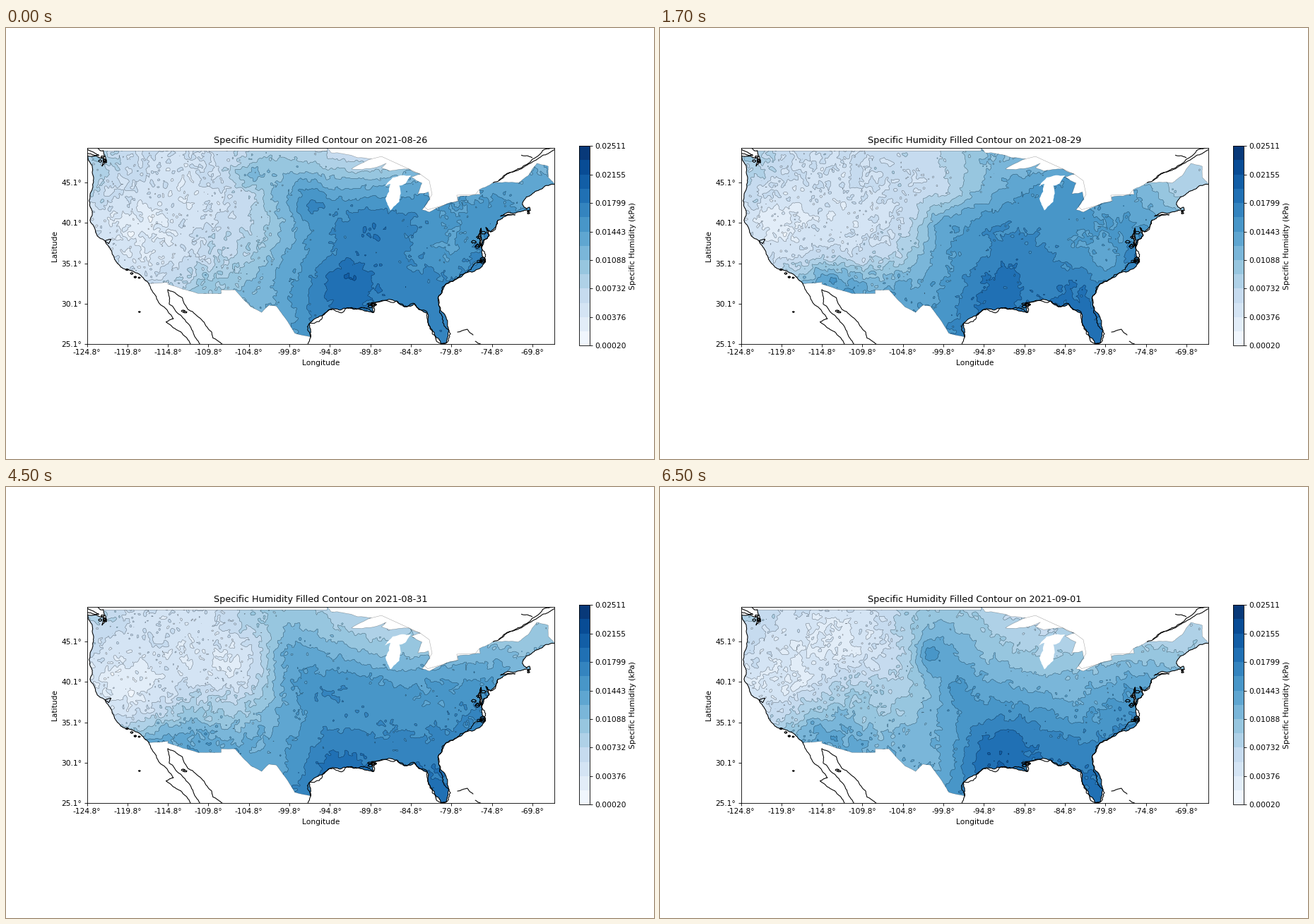
Animation, 917 px wide and 611 px high, one loop 8000 ms. Source, as a matplotlib script:

```python
import numpy as np
import matplotlib.pyplot as plt
from matplotlib.animation import FuncAnimation
from matplotlib.path import Path

W, H, S = 917, 611, 0.764
WEST, EAST, SOUTH, NORTH = -124.767, -67.058, 25.067, 49.4
LEVELS = np.linspace(0.0002, 0.02511, 15)
rng = np.random.default_rng(12)

plt.rcParams.update({
    "font.family": "DejaVu Sans", "font.size": 10 * S,
    "axes.titlesize": 12 * S, "axes.titlepad": 6 * S, "axes.labelpad": 4 * S,
    "axes.linewidth": 0.8 * S,
    **{f"{a}tick.major.{k}": v * S for a in "xy"
       for k, v in (("size", 3.5), ("width", 0.8), ("pad", 3.5))},
})

X, Y = np.meshgrid(np.linspace(WEST, EAST, 520), np.linspace(SOUTH, NORTH, 220))


def roughen(points, depth=4, jag=0.13):
    """Midpoint displacement of a polyline."""
    p = np.array(points, float)
    for _ in range(depth):
        step = np.diff(p, axis=0)
        normal = step[:, ::-1] * [-1, 1]
        mid = p[:-1] + step / 2 + normal * rng.uniform(-jag, jag, (len(step), 1))
        out = np.empty((2 * len(p) - 1, 2))
        out[::2], out[1::2] = p, mid
        p = out
    return p


def fractal_noise(slope=1.35, longest=2.5):
    """Unit-variance noise without waves longer than `longest` degrees."""
    ky = np.fft.fftfreq(Y.shape[0], Y[1, 0] - Y[0, 0])[:, None]
    kx = np.fft.rfftfreq(X.shape[1], X[0, 1] - X[0, 0])
    k = np.hypot(kx, ky)
    gain = (k ** 2 + 1 / longest ** 2) ** (-slope / 2) * np.exp(-(k / 2.6) ** 2)
    noise = np.fft.irfft2(np.fft.rfft2(rng.normal(size=X.shape)) * gain, X.shape)
    return (noise - noise.mean()) / noise.std()


# ---- outlines as (lon, lat) ----
pacific = roughen([
    (-122.76, 49), (-122.4, 47.9), (-122.9, 47.1), (-122.7, 48.1), (-124.7, 48.38),
    (-124.1, 46.9), (-123.95, 45.5), (-124.5, 42.85), (-124.1, 41.5), (-124.4, 40.4),
    (-123.7, 38.9), (-122.5, 37.75), (-121.8, 36.7), (-120.6, 34.6), (-119.3, 34.15),
    (-118.35, 33.75), (-117.12, 32.53)], jag=0.1)
rio = roughen([
    (-117.12, 32.53), (-114.72, 32.72), (-114.8, 32.5), (-111.07, 31.33), (-108.2, 31.33),
    (-108.2, 31.78), (-106.5, 31.78), (-104.5, 29.65), (-103.2, 28.98), (-102.3, 29.88),
    (-101.4, 29.77), (-100.3, 28.3), (-99.1, 26.4), (-97.15, 25.96)], 3, 0.02)
GULF = [
    (-97.15, 25.96), (-97.3, 27.6), (-94.75, 29.35), (-92.3, 29.53), (-91.3, 29.4),
    (-89.4, 28.95), (-89.6, 30.2), (-86.5, 30.38), (-85.3, 29.68), (-84.3, 30.05),
    (-82.75, 28.9), (-82.6, 27.6), (-81.8, 26.1), (-81.1, 25.15), (-80.4, 25.2)]
SOUTHEAST = [
    (-80.4, 25.2), (-80.05, 26.7), (-81.3, 29.8), (-81.4, 30.9), (-80.6, 32.3),
    (-79.2, 33.1), (-77.95, 33.9), (-75.55, 35.25), (-76, 36.9), (-76.4, 38.3),
    (-76.1, 39.4), (-75.95, 37.2), (-75.1, 38.5), (-75.5, 39.5), (-74.9, 38.95), (-74, 40.4)]
northeast = roughen([
    (-74, 40.4), (-71.9, 41.07), (-73.7, 40.9), (-71.4, 41.45), (-70, 41.6), (-70.1, 42),
    (-70.5, 41.8), (-71, 42.35), (-70.5, 43.3), (-69, 44.1), (-67, 44.85)])
north = roughen([
    (-67, 44.85), (-67.8, 45.7), (-67.8, 47.07), (-69.2, 47.45), (-70.3, 45.9),
    (-71.5, 45.02), (-74.7, 45), (-76.3, 44.2), (-76.2, 43.6), (-79, 43.27),
    (-78.9, 42.8), (-82.5, 41.4), (-83.4, 41.7), (-82.4, 43), (-82.6, 43.9),
    (-83.9, 43.65), (-83.4, 45), (-84.75, 45.75), (-83.6, 46.1), (-85, 46.75),
    (-87.4, 46.5), (-88.4, 46.9), (-87.8, 47.45), (-89.6, 46.83), (-92.1, 46.75),
    (-89.6, 48), (-93, 48.6), (-94.6, 48.75), (-95.15, 49.38)], 3, 0.05)
parallel = np.array([(-95.15, 49.38), (-95.15, 49), (-122.76, 49)])
lake = roughen([
    (-87.3, 41.62), (-87.9, 43.1), (-87.3, 44.9), (-88, 44.6), (-87, 45.7),
    (-84.75, 45.95), (-85.5, 44.9), (-86.2, 44.7), (-86.2, 42.7), (-87.3, 41.62)], 3, 0.09)
lake_border = np.array([
    (-89.6, 48), (-88.4, 48.3), (-83.6, 46.1), (-82.5, 45.3), (-82.15, 43.6),
    (-83.1, 42.1), (-82.7, 41.7), (-79, 42.75), (-79.1, 43.5), (-76.8, 43.6), (-76.3, 44.2)])

vancouver = [(-124.8, 49.3), (-123.3, 48.45), (-124.8, 48.65)]
fraser = [(-123.5, 49.4), (-123.1, 49), (-122.76, 49)]
baja_west = [(-117.12, 32.53), (-116, 30.4), (-114.1, 28.2), (-115, 27.8),
             (-113.2, 26.6), (-112, 25)]
cortez = [(-110.8, 25), (-112.8, 28.2), (-114.6, 30), (-114.8, 31.8), (-113, 30.8),
          (-112.2, 29.3), (-109.4, 26.6), (-109.2, 25.8), (-108, 25)]
mexico_east = [(-97.15, 25.96), (-97.5, 25)]
estuary = np.array([(-74.6, 45.05), (-72.6, 46.25), (-71.2, 46.85), (-68.5, 49.05),
                    (-67, 49.5)])
estuary_south = [(-73.9, 45.35), (-71, 46.85), (-68.8, 48.2), (-67, 49.15)]
saguenay = [(-71.1, 48.45), (-69.8, 48.15)]
bahamas = [(-79, 26.55), (-77.8, 26.9), (-77.1, 26.2)]
eleuthera = [(-76.8, 25.4), (-76.1, 25)]
golden_gate = [(-122.5, 37.8), (-122.1, 37.5), (-121.8, 38.05), (-122.5, 37.85)]
foreign = [roughen(c, jag=0.09) for c in
           (vancouver, fraser, baja_west, cortez, mexico_east, estuary, estuary_south,
            saguenay, bahamas, eleuthera, golden_gate)]

# centre lon, lat, spread, count, radius of groups of small islands and inlets
ISLANDS = [(-119.4, 33.9, .6, 2, .16), (-118.5, 33.1, .4, 3, .12), (-118.3, 29.05, 0, 1, .1),
           (-122.7, 48.1, .5, 5, .2), (-112.9, 29.1, .4, 2, .2), (-89.8, 29.9, .5, 4, .28),
           (-76.3, 38, .9, 5, .3), (-76.3, 35.7, .5, 4, .3), (-70.4, 41.35, .2, 2, .13)]

# ---- humidity, counted in contour bands ----
COLUMNS = [-123.5, -117, -111, -105, -100, -95, -89.5, -83, -76, -70]
ROWS = [(48, 0), (44, 0), (40, 0), (36, 0), (32.5, 2), (29, 4)]  # latitude, first column


def smooth_field(rows, spots):
    """Radial interpolation through the rows and the extra spots."""
    sites = [(COLUMNS[first + i], lat, v) for (lat, first), values in zip(ROWS, rows)
             for i, v in enumerate(values)]
    x, y, v = np.array(sites + spots).T

    def kernel(dx, dy):
        return np.sqrt(dx ** 2 + dy ** 2 + 0.5)

    weights = np.linalg.solve(kernel(x[:, None] - x, y[:, None] - y), v - v.mean())
    return v.mean() + sum(w * kernel(X - a, Y - b) for w, a, b in zip(weights, x, y))


aug26 = smooth_field(
    [[4.4, 2.7, 2.9, 4.2, 4.9, 4.3, 3.5],
     [3.6, 2.5, 2.4, 3.8, 6.8, 7.6, 7.6, 7.8, 7.8, 7.5],
     [2.5, 1.6, 3.2, 3.8, 6.4, 8.8, 10, 8.8, 8.6],
     [3.4, 2, 3.4, 4.6, 7, 8.9, 9.5, 8.6, 9.3],
     [4.9, 5.8, 7.8, 10.2, 10, 9.4], [7.4, 9.8, 9.8, 9.5]],
    [(-92.6, 33.5, 11), (-97.2, 42.8, 9.2), (-104.6, 46, 6.3), (-80, 37.5, 7.8)])
aug29 = smooth_field(
    [[4.2, 2.8, 3.1, 3.4, 3.9, 6, 6.2],
     [3.5, 2.5, 2.8, 3.3, 3.5, 6.3, 8, 8.4, 6.8, 4.6],
     [2.4, 2.2, 2.6, 3, 7.3, 8.6, 8.8, 8.2, 8.1],
     [3.2, 3, 3.4, 4.5, 7.4, 8.9, 9.4, 8.3, 9.9],
     [7.3, 6.8, 8, 9.9, 9.7, 9.9], [8.2, 10.2, 10.1, 10.3]],
    [(-92, 33.7, 10.4), (-121.2, 40.2, 1.6), (-79, 35.4, 7.6), (-114.7, 33.2, 7.3)])
aug30 = smooth_field(
    [[4.3, 2.8, 2.7, 3.7, 4.6, 5.7, 4],
     [3.2, 2.6, 2.4, 2.9, 6.2, 5.7, 5.1, 6.2, 6.8, 5.9],
     [2.2, 1.9, 2.5, 2.9, 7.4, 8.5, 8.8, 8.3, 8.6],
     [3.2, 2.8, 3.5, 4.8, 7.6, 8.8, 9.3, 8.9, 9.4],
     [7, 6.9, 8.1, 9.3, 9.3, 9.2], [7.9, 10.2, 10.2, 10]],
    [(-99.4, 42.5, 8.2), (-116, 33.6, 7.2), (-121.2, 40.4, 1.4), (-89.4, 42.5, 5.2)])
aug31 = smooth_field(
    [[3.8, 2.6, 2.5, 4.4, 5.5, 5.1, 3.9],
     [3, 2.4, 2.4, 2.6, 7, 6.8, 5.7, 5.6, 6.2, 5.8],
     [2.2, 1.8, 3.1, 3, 7.4, 8.8, 8.4, 8, 8.2],
     [3.2, 3.2, 5.6, 5.3, 7.4, 8.5, 8.7, 8.4, 9.2],
     [7.5, 6.9, 7.9, 9.4, 9.2, 9.2], [7.9, 10.6, 10.3, 10]],
    [(-116.4, 32.9, 7.6), (-106.2, 43.2, 1.9), (-95.3, 39.3, 9.1), (-121, 40.6, 1.4)])
sep01 = smooth_field(
    [[3.8, 2.4, 2.4, 4.2, 5.5, 5, 3.8],
     [3, 1.8, 1.8, 3.7, 7.5, 6, 4.9, 4.9, 5.2, 4.9],
     [2.2, 2.2, 4.6, 4.3, 7, 7.3, 6.6, 6.5, 7.6],
     [3.2, 4.6, 5.8, 5.3, 7, 8.5, 8.6, 7.6, 9],
     [7.2, 6.4, 7.1, 10.2, 10, 9.2], [7, 10.6, 10.2, 10]],
    [(-101.3, 43.7, 8.3), (-98.1, 39.2, 8.5), (-92, 33.4, 10.5), (-116, 34.5, 7)])
DAYS = {"2021-08-26": aug26, "2021-08-29": aug29, "2021-08-30": aug30,
        "2021-08-31": aug31, "2021-09-01": sep01}


def box(left, top, right, bottom):
    return [left / W, 1 - bottom / H, (right - left) / W, (bottom - top) / H]


fig = plt.figure(figsize=(W / 100, H / 100), dpi=100, facecolor="white")
ax = fig.add_axes(box(114.6, 169.5, 775.9, 448))
ax.set(xlim=(WEST, EAST), ylim=(SOUTH, NORTH), xlabel="Longitude", ylabel="Latitude")
xticks, yticks = np.arange(WEST, EAST, 5), np.arange(SOUTH, NORTH, 5)
ax.set_xticks(xticks, [f"{v:.1f}°" for v in xticks])
ax.set_yticks(yticks, [f"{v:.1f}°" for v in yticks])
title = ax.set_title("")

gulf, southeast = roughen(GULF), roughen(SOUTHEAST)
land = Path(np.vstack([pacific, rio, gulf, southeast, northeast, north, parallel]))

# Rugged in the western ranges and along the Appalachians, calm on the plains.
ruggedness = (0.17 + 0.2 / (1 + np.exp((X + 104) / 1.2))
              + 0.22 * np.exp(-((X + 80.5) / 3) ** 2 - ((Y - 37.8) / 2.5) ** 2))
terrain = fractal_noise()

maps = []
for bands in DAYS.values():
    relief = ruggedness * (0.85 * terrain + 0.5 * fractal_noise())
    q = LEVELS[0] + (bands + relief) * (LEVELS[1] - LEVELS[0])
    fill = ax.contourf(X, Y, q, LEVELS, cmap="Blues", zorder=1)
    lines = ax.contour(X, Y, q, LEVELS, colors="black", linewidths=0.5 * S,
                       alpha=0.45, zorder=1.5)
    for layer in (fill, lines):
        layer.set_clip_path(land, ax.transData)
    maps.append((fill, lines))

ax.fill(*lake.T, color="white", lw=0, zorder=2)
for edge in (lake_border, north, parallel, rio):
    ax.plot(*edge.T, color="black", alpha=0.35, lw=0.5 * S, zorder=2.1)

# The low southern shores get a second line for their barrier islands.
barriers = [roughen(c, jag=0.2) for c in (GULF, SOUTHEAST)]
shore = dict(color="black", lw=S, zorder=3)
for line in [pacific, gulf, southeast, northeast, *barriers, *foreign]:
    ax.plot(*line.T, **shore)
angle = np.linspace(0, 2 * np.pi, 7)
for lon, lat, spread, count, r in ISLANDS:
    for dx, dy in rng.uniform(-spread, spread, (count, 2)):
        ring = np.c_[lon + dx + r * np.cos(angle), lat + dy + 0.6 * r * np.sin(angle)]
        ax.plot(*roughen(ring, 2, 0.35).T, **shore)

bar = fig.colorbar(maps[0][0], cax=fig.add_axes(box(811, 167.2, 825.5, 450.3)),
                   ticks=LEVELS[::2], format="%.5f")
bar.set_label("Specific Humidity (kPa)")


def update(frame):
    day = (frame + 3) // 4
    for i, layers in enumerate(maps):
        for layer in layers:
            layer.set_visible(i == day)
    title.set_text(f"Specific Humidity Filled Contour on {list(DAYS)[day]}")
    return [title, *sum(maps, ())]


anim = FuncAnimation(fig, update, frames=16, interval=500, repeat=True, blit=False)
plt.show()
```
